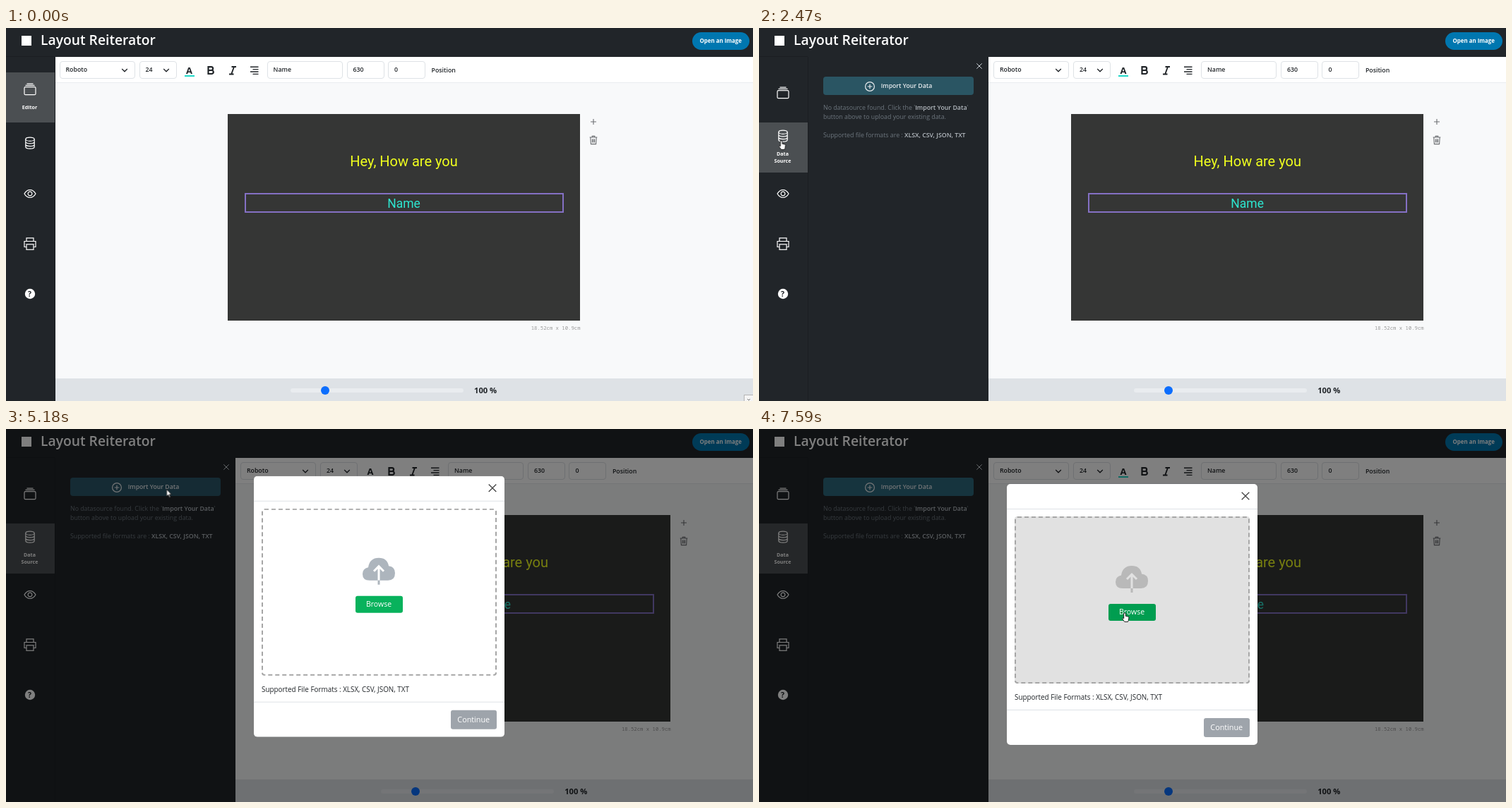
These frames come from a looping animation (1058 px wide and 529 px high, 8 s). An HTML page:

```html
<!DOCTYPE html>
<html lang="en">
<head>
<meta charset="utf-8">
<title>Layout editor</title>
<style>
html, body { margin: 0; width: 100%; height: 100%; overflow: hidden; background: #212529; }
#stage { position: relative; width: 1058px; height: 529px; overflow: hidden; background: #212529;
  font: 600 8.8px "Open Sans", "Noto Sans", sans-serif; color: #212529; }
#stage div, svg { position: absolute; box-sizing: border-box; }
svg { width: 1px; height: 1px; overflow: visible; fill: none; stroke: currentColor; }
#stage .t { white-space: nowrap; line-height: 0; }
.c { text-align: center; }

/* every part shares one 8 s clock */
.anim { animation: 8s ease-in-out infinite; }
.step { animation: 8s step-end infinite; }

.title { left: 49px; top: 16.5px; font-size: 19.3px; font-weight: 600; color: #fff; }
.logo { left: 22px; top: 11px; width: 14px; height: 14px; background: #fff; }
.open { left: 972px; top: 5.5px; width: 80.5px; height: 25px; border-radius: 13px; background: #0077b0;
  color: #fff; font-size: 7.9px; font-weight: 700; line-height: 24px; text-align: center; }

.side { left: 0; top: 41px; width: 69px; height: 488px; color: #fff; box-shadow: 1px 0 #1b1e22, 0 -1px #1b1e22; }
.tab { left: 0; width: 69px; height: 71.3px; }
.tab svg { left: 33.5px; top: 29.3px; stroke-width: 1.2; }
.tab .t { left: 0; width: 67px; font-size: 7.1px; font-weight: 700; }
.editor { animation-name: editor; }
.editor svg { animation-name: editorIcon; }
.editor .t { animation-name: editorLabel; }
.data { animation-name: data; }
.data svg { animation-name: dataIcon; }
.data .t { animation-name: dataLabel; }
@keyframes editor { 0% { background: #4b4f52 } 24.6%, 100% { background: none } }
@keyframes editorIcon { 0% { top: 24.3px } 24.6%, 100% { top: 29.3px } }
@keyframes editorLabel { 0% { opacity: 1 } 24.6%, 100% { opacity: 0 } }
@keyframes data { 0%, 21.6% { background: #4b4f5200 } 22.8%, 100% { background: #4b4f52 } }
@keyframes dataIcon { 0% { top: 29.3px } 14%, 100% { top: 18.8px } }
@keyframes dataLabel { 0% { opacity: 0 } 14%, 100% { opacity: 1 } }

.row { left: 69px; top: 41px; width: 989px; height: 488px; display: flex; }
#stage .panel { position: relative; flex: none; overflow: hidden; color: #6c757d; animation-name: panel; }
@keyframes panel {
  0%, 24.375% { width: 0; animation-timing-function: ease }
  30%, 100% { width: 256.4px }
}
.panel .body { left: 22px; right: 21px; top: 28px; line-height: 13.75px; font-weight: 400; }
.panel p { margin: 0 0 11.4px; }
.panel b { font-weight: 600; color: #b4bac0; }
#stage .import { position: relative; height: 26px; padding-top: 1px; margin-bottom: 11.7px; border-radius: 4px; color: #e9ecef;
  font-weight: 600; font-size: 8.7px; display: flex; align-items: center; justify-content: center;
  white-space: nowrap; animation-name: importButton; }
.import svg { position: static; flex: none; width: 14px; height: 14px; margin-right: 8.5px; stroke-width: 1.2; }
@keyframes importButton {
  0%, 37.5% { background: #2a5563 }
  38.9%, 61.5% { background: #146c87 }
  63.4%, 63.8% { background: #2b5261 }
  66.6%, 100% { background: #2c687c }
}

#stage .main { position: relative; flex: 1; height: 488px; overflow: hidden; background: #f8f9fa; }
.bar { left: 0; top: 0; width: 100%; height: 37px; background: #fff; border-bottom: 1px solid #e9ecef; }
.field { top: 6px; height: 24.5px; border: 1px solid #dee2e6; border-radius: 4px; line-height: 23px; padding-left: 8px; }
.bar svg { top: 18.5px; }
.foot { left: 0; bottom: 0; width: 100%; height: 32px; background: #dee2e6; }
.track { left: calc(50% - 160.5px); top: 13.5px; width: 245px; height: 6px; border-radius: 3px; background: #e9ecef; }
.knob { left: 43px; top: -3px; width: 12px; height: 12px; border-radius: 50%; background: #0d6efd; }
.art { left: calc(50% - 249.5px); top: 81px; width: 499px; height: 293px; background: #353635;
  font-family: Roboto, sans-serif; font-weight: 400; }
.art > svg { left: 517.5px; color: #6c6f72; stroke-width: 1.1; }
.picked { left: 24px; top: 112px; width: 452px; height: 28px; border: 2px solid #8470c4; }

.shade { inset: 0; background: #000; animation-name: shade; }
@keyframes shade { 0%, 62.85% { opacity: 0; animation-timing-function: linear } 64.725%, 100% { opacity: .5 } }
.modal { left: 351px; top: 78px; width: 355px; height: 370px; border-radius: 5px; background: #fff;
  animation: show 8s linear infinite, drop 8s ease-out infinite; }
@keyframes show { 0%, 62.85% { opacity: 0 } 64.725%, 100% { opacity: 1 } }
@keyframes drop { 0%, 62.85% { transform: translateY(-37px) } 66.6%, 100% { transform: none } }
.rule { left: 0; width: 100%; height: 1px; background: #dee2e6; }
.zone { left: 11px; top: 46px; width: 333px; height: 236.5px; border: 2px dashed #a6a6a6; border-radius: 4px; animation-name: zone; }
.cloud { left: 164px; top: 84px; stroke: inherit; stroke-width: 3; }
@keyframes zone {
  0% { background: #fff; stroke: #fff; color: #adb5bd }
  85%, 100% { background: #e1e1e1; stroke: #e1e1e1; color: #b9b9b9 }
}
.btn { border-radius: 3px; color: #fff; font-weight: 400; text-align: center; }
.browse { left: 143.5px; top: 169.5px; width: 67px; height: 24px; line-height: 23.5px; font-size: 10.5px; animation-name: browse; }
@keyframes browse { 0%, 93.5% { background: #08b25c } 94.8%, 100% { background: #009d50 } }
.next { left: 279px; top: 332px; width: 64.5px; height: 27px; line-height: 26.5px; font-size: 10.8px; background: #9ea4ab; }

.corner { left: 1045px; top: 520px; width: 14px; height: 10px; background: #f4f4f4; border: 1px solid #b5b5b5; animation-name: corner; }
@keyframes corner { 0% { opacity: 1 } 1.5%, 100% { opacity: 0 } }

.cursor { left: 0; top: 0; animation-name: cursor; }
.cursor path { fill: #fff; stroke: #111; stroke-width: .9; stroke-linejoin: round; }
.arrow { animation-name: arrow; }
.hand { animation-name: hand; }
@keyframes cursor {
  0%, 6.62% { transform: translate(1100px, 600px) }
  6.63% { transform: translate(864px, 484px) }
  15.25%, 17.5% { transform: translate(24px, 156px) }
  19%, 28% { transform: translate(26.5px, 158px) }
  31.5%, 31.88% { transform: translate(32px, 160px) }
  38.88%, 41.1% { transform: translate(225px, 88px) }
  43.1%, 45.6% { transform: translate(225.5px, 89px) }
  47.9%, 61.5% { transform: translate(228px, 86.5px) }
  62%, 79.6% { transform: translate(227.5px, 85.5px) }
  89.25%, 89.9% { transform: translate(447px, 153px) }
  94.9%, 100% { transform: translate(518px, 261px) }
}
@keyframes arrow { 0%, 33.8%, 62% { opacity: 1 } 14%, 37.5%, 93.5%, 100% { opacity: 0 } }
@keyframes hand { 0%, 33.8%, 62% { opacity: 0 } 14%, 37.5%, 93.5%, 100% { opacity: 1 } }
</style>
</head>
<body>
<div id="stage">
  <div class="logo"></div>
  <div class="t title">Layout Reiterator</div>
  <div class="open">Open an Image</div>

  <div class="row">
    <div class="panel anim">
      <svg style="left:auto;right:12px;top:12.5px;color:#ced4da"><path d="M-3.7-3.7l7.4 7.4m0-7.4l-7.4 7.4"/></svg>
      <div class="body">
        <div class="import anim"><svg viewBox="-7 -7 14 14"><circle r="6.4"/><path d="M-3.3 0h6.6M0-3.3v6.6"/></svg>Import Your Data</div>
        <p>No datasource found. Click the '<b>Import Your Data</b>' button above to upload your existing data.</p>
        <p>Supported file formats are : <b>XLSX, CSV, JSON, TXT</b></p>
      </div>
    </div>

    <div class="main">
      <div class="bar">
        <div class="field" style="left:6.5px;width:107px">Roboto</div>
        <div class="field" style="left:119.5px;width:53px">24</div>
        <svg style="left:98.5px;stroke-width:1.3"><path d="M-3.8-2L0 1.8 3.8-2M55.2-2l3.8 3.8 3.8-3.8"/></svg>
        <div class="t c" style="left:180.5px;top:18.5px;width:20px;font-size:13px;font-weight:700">A</div>
        <div style="left:183.5px;top:25.5px;width:14px;height:2.5px;background:#20d8c8"></div>
        <svg style="left:221px;stroke-width:2.2"><path d="M-3.5-4.8h4.2a2.3 2.3 0 0 1 0 4.8h-4.2h4.8a2.5 2.5 0 0 1 0 5h-4.8z"/></svg>
        <svg style="left:252px;stroke-width:1.9"><path d="M-1.5-5h6.5M-5 5.5h6.5M2-5l-3.8 10.5"/></svg>
        <svg style="left:282.5px;stroke-width:1.4"><path d="M-6-4.8h11.5M-2.5-1.4h8M-6 2h11.5M-2.5 5.4h8"/></svg>
        <div class="field" style="left:300.5px;width:107.5px">Name</div>
        <div class="field" style="left:413.5px;width:53px">630</div>
        <div class="field" style="left:472px;width:53px">0</div>
        <div class="t" style="left:533.5px;top:18.5px">Position</div>
      </div>

      <div class="art">
        <div class="t c" style="left:0;top:66.5px;width:499px;font-size:20px;color:#f0ff1e">Hey, How are you</div>
        <div class="picked"></div>
        <div class="t c" style="left:0;top:126.5px;width:499px;font-size:17.5px;color:#2de6d0">Name</div>
        <svg style="top:10.5px"><path d="M-4 0h8M0-4v8"/></svg>
        <svg style="top:37px"><path d="M-5.3-4h10.6M-1.8-4v-1.6h3.6v1.6M-4.2-4l.6 9.6h7.2l.6-9.6M-1.6-1.5v5M0-1.5v5M1.6-1.5v5"/></svg>
        <div class="t" style="right:-.5px;top:303px;font:7.27px/0 'Noto Sans Mono',monospace;color:#999">18.52cm x 10.9cm</div>
      </div>

      <div class="foot">
        <div class="track">
          <div class="knob"></div>
          <div class="t" style="left:260px;top:3.5px;font-size:11.2px;font-weight:700">100 %</div>
        </div>
      </div>
    </div>
  </div>

  <div class="side">
    <div class="tab editor step" style="top:21.8px">
      <svg class="step"><rect x="-8" y="-3.3" width="16" height="11" rx="1.5"/><path d="M-6.5-5.6h13M-4.5-7.8h9"/></svg>
      <div class="t c step" style="top:49px">Editor</div>
    </div>
    <div class="tab data anim" style="top:93.1px">
      <svg class="step"><ellipse cy="-5.3" rx="6.2" ry="2.6"/><path d="M-6.2-5.3V5.5c0 3.5 12.4 3.5 12.4 0V-5.3M-6.2-1.7c0 3.5 12.4 3.5 12.4 0M-6.2 1.9c0 3.5 12.4 3.5 12.4 0"/></svg>
      <div class="t c step" style="top:43.5px">Data</div>
      <div class="t c step" style="top:54.3px">Source</div>
    </div>
    <div class="tab" style="top:164.4px"><svg><path d="M-8 0c4-7.3 12-7.3 16 0c-4 7.3-12 7.3-16 0z"/><circle r="2.9"/></svg></div>
    <div class="tab" style="top:235.7px"><svg><path d="M-5-3.5v-4.7H5v4.7M-5 4.5h-3v-8H8v8H5"/><rect x="-5" y=".8" width="10" height="7.5"/></svg></div>
    <div class="tab" style="top:307px">
      <svg><circle r="7.2" fill="#fff" stroke="none"/></svg>
      <div class="t c" style="top:29.3px;font-size:10.5px;color:#212529">?</div>
    </div>
  </div>

  <div class="corner step"><svg style="left:6px;top:6px;color:#777"><path d="M-2-1l2 2 2-2"/></svg></div>
  <div class="shade anim"></div>

  <div class="modal">
    <svg style="left:338px;top:17px;color:#444;stroke-width:1.3"><path d="M-5.3-5.3L5.3 5.3M5.3-5.3L-5.3 5.3"/></svg>
    <div class="rule" style="top:34.5px"></div>
    <div class="zone step">
      <svg class="cloud">
        <path fill="currentColor" stroke="none" d="M-13 16q-10 0-10-9q0-8 8-9.5q2-13.5 15-13.5q12 0 14 11.5q9 1 9 10q0 10.5-10 10.5z"/>
        <path d="M0 16V-3M-7 3L0-4 7 3"/>
        <path stroke="currentColor" d="M0 16v6"/>
      </svg>
    </div>
    <div class="btn browse anim">Browse</div>
    <div class="t" style="left:11px;top:301.5px;font-size:9.9px;font-weight:500">Supported File Formats : XLSX, CSV, JSON, TXT</div>
    <div class="rule" style="top:320px"></div>
    <div class="btn next">Continue</div>
  </div>

  <div class="cursor anim">
    <svg class="arrow step"><path d="M0 0v10l2.3-2.1 1.6 3.6 1.5-.7-1.6-3.4h3.1z"/></svg>
    <svg class="hand step"><path d="M-1.3 1a1.3 1.3 0 0 1 2.6 0v3.3l3.6.8q1.2.4 1 1.7l-.7 3.7-.8 2h-4.6l-3.2-4.4q.1-1.8 2.1-.4z"/></svg>
  </div>
</div>
</body>
</html>
```
